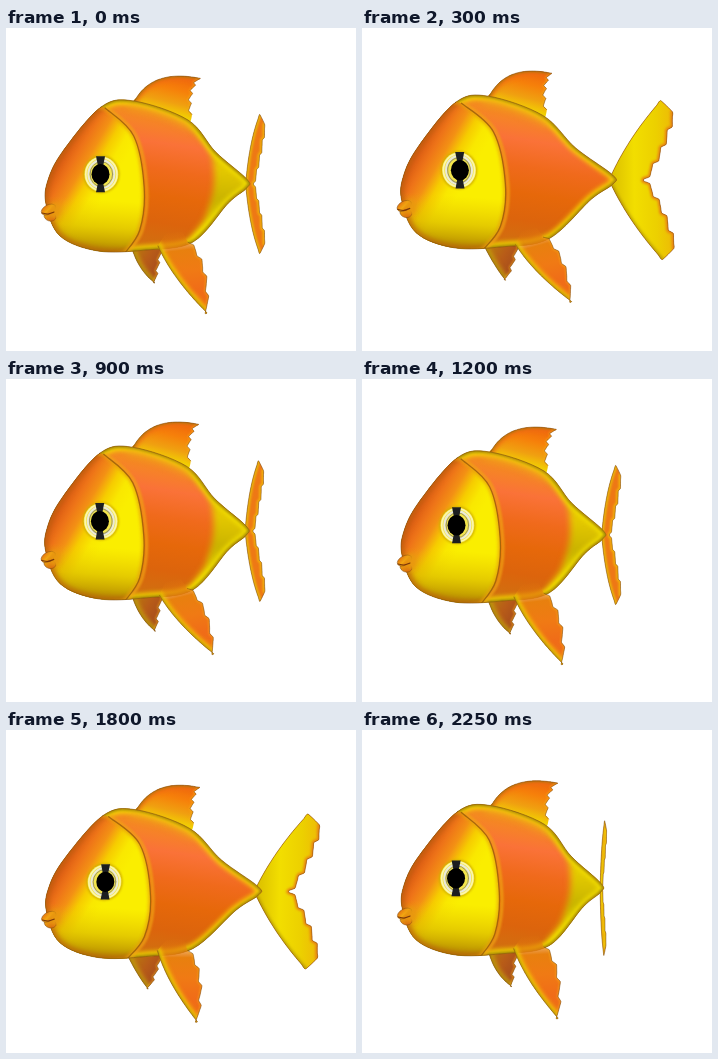
An HTML page with a canvas that plays this animation: 350 by 323 pixels, repeating every 2.4 s.

```html
<!DOCTYPE html>
<html lang="en">
<head>
<meta charset="utf-8">
<title>Goldfish</title>
<style>
  html, body { margin: 0; width: 100%; height: 100%; overflow: hidden; background: #fff; }
  canvas { display: block; width: 350px; height: 323px; }
</style>
</head>
<body>
<canvas id="stage" width="350" height="323"></canvas>
<script>
const ctx = document.getElementById('stage').getContext('2d');
const STEP = 150, STEPS = 16, TAU = 2 * Math.PI;
const ORANGE = '#f0720c', CORAL = '#fa7238', YELLOW = '#f4e000', OLIVE = '#9c7c08', EDGE = '#7d4a10';

const pairs = text => text.split(' ').map(p => p.split(',').map(Number));
const clamp = (v, a = 0, b = 1) => Math.min(b, Math.max(a, v));

const BODY = pairs('95,79 57,123 42,152 40,176 54,208 92,223 140,222 187,214 226,175 246,160 246,151 212,124 182,92 128,73');
const SEAM = pairs('100,80 130,108 141,160 136,202 119,226');

// Smooth curve through a few points.
function smooth(pts, closed = false, k = 6) {
  const n = pts.length, p = new Path2D();
  const at = i => closed ? pts[(i + n) % n] : pts[clamp(i, 0, n - 1)];
  p.moveTo(...pts[0]);
  for (let i = 0; i < (closed ? n : n - 1); i++) {
    const [a, b, c, d] = [at(i - 1), at(i), at(i + 1), at(i + 2)];
    p.bezierCurveTo(b[0] + (c[0] - a[0]) / k, b[1] + (c[1] - a[1]) / k,
      c[0] - (d[0] - b[0]) / k, c[1] - (d[1] - b[1]) / k, c[0], c[1]);
  }
  if (closed) p.closePath();
  return p;
}

// Points on a quadratic arc; `ragged` cuts teeth of that depth into it.
function arc([ax, ay], [cx, cy], [bx, by], ragged = 0, teeth = 4) {
  const len = Math.hypot(bx - ax, by - ay), n = 16;
  return Array.from({ length: n + 1 }, (_, i) => {
    const t = i / n, u = 1 - t;
    const off = ragged * ((t * teeth) % 1 - 0.5) / len;
    return [u * u * ax + 2 * u * t * cx + t * t * bx + off * (by - ay),
      u * u * ay + 2 * u * t * cy + t * t * by - off * (bx - ax)];
  });
}

function ramp(x0, y0, x1, y1, ...stops) {
  const g = ctx.createLinearGradient(x0, y0, x1, y1);
  stops.forEach((c, i) => g.addColorStop(i / (stops.length - 1), c));
  return g;
}

function paint(kind, path, color, blur, alpha, width) {
  ctx.save();
  if (blur) ctx.filter = `blur(${blur}px)`;
  ctx.globalAlpha = alpha;
  ctx[kind + 'Style'] = color;
  ctx.lineWidth = width;
  ctx.lineJoin = ctx.lineCap = 'round';
  ctx[kind](path);
  ctx.restore();
}
const fill = (path, color, blur = 0, alpha = 1) => paint('fill', path, color, blur, alpha, 1);
const stroke = (path, color, width, blur = 0, alpha = 1) => paint('stroke', path, color, blur, alpha, width);

// Filled form, shading kept inside it, thin contour.
function part(path, color, shade, contour = path) {
  fill(path, color);
  ctx.save();
  ctx.clip(path);
  shade();
  ctx.restore();
  stroke(contour, EDGE, 0.8, 0, 0.7);
}

function oval(x, y, rx, ry = rx, turn = 0) {
  const p = new Path2D();
  p.ellipse(x, y, rx, ry, turn, 0, TAU);
  return p;
}

// Fin with a plain leading edge and a ragged trailing edge.
function fin(lead, trail, root, color, rim) {
  const outline = [...lead, ...trail];
  const front = smooth(lead), rear = smooth(trail, false, 12);
  part(smooth([...outline, ...root], true, 12), color, () => {
    stroke(front, rim, 7, 2, 0.85);
    stroke(front, OLIVE, 2.5, 0.8, 0.7);
    stroke(rear, '#f9b01a', 2, 0.8, 0.7);
  }, smooth(outline, false, 12));
}

function drawTail(s) {
  const turn = Math.sin((47 - 41 * s) * Math.PI / 180);
  const high = (75.5 - 6.5 * s) / 80.5, lit = clamp(-s * 1.5);
  const fold = ([x, y]) => [x * turn ** (1.5 - x / 138), y * high];
  const lead = arc([-2, -3], [17, -42], [51, -79]);
  const trail = arc([65, -67], [56, -30], [35, 0], 5);
  const flip = pts => pts.map(([x, y]) => [x, -y]).reverse();
  const edge = [...trail, ...flip(trail)].map(fold);
  const fronts = [lead.map(fold), flip(lead).map(fold)];
  const shape = smooth([...fronts[0], ...edge, ...fronts[1]], true, 12);
  ctx.save();
  ctx.translate(245.5 - 7.5 * s, 156);
  part(shape, ramp(0, 0, 60, 0, '#ee7a14', '#ee6c1c'), () => {
    for (const f of fronts) stroke(smooth(f), '#e8c808', 4, 1.2, 0.8);
    stroke(smooth(edge), YELLOW, 4, 1, 0.8 * clamp(s));
    fill(shape, ramp(0, 0, 66, 0, '#dcc000', '#f2de00', '#ecd000', '#eeb408'), 0, lit);
    stroke(smooth(edge), '#e88414', 4, 1.2, lit);
    stroke(smooth(fronts[1]), OLIVE, 3, 1.5, lit * 0.7);
  });
  ctx.restore();
}

function drawDorsal(s) {
  const tip = [191 + 2 * s, 50];
  fin(arc([128, 74], [145, 41], tip), arc(tip, [181, 62], [184, 86], -4), [[182, 96], [150, 86]],
    ramp(165, 46, 155, 86, '#f0680c', '#f6800a', '#f0a010', '#f2d800'), '#ee6c14');
}

function drawFlank(shape, s) {
  const stock = clamp(0.45 + s * 0.75);
  const belly = smooth([[185, 90], [204, 122], [208, 155], [200, 188], [186, 220], [260, 220], [260, 95]], true);
  fill(belly, ramp(215, 105, 205, 205, '#cfa80c', '#e6cc00', '#c8b400', '#e8d800'), 3, stock);
  stroke(shape, YELLOW, 10, 2, 0.85);
  stroke(shape, OLIVE, 4, 1.2, 0.8);
  stroke(smooth([[125, 78], [155, 86], [185, 100]]), '#f0a818', 6, 3, 0.6);
}

function drawHead(shape, head) {
  ctx.save();
  ctx.clip(head);
  fill(head, ramp(61, 122, 109, 150, '#dc5c14', '#ee7418', '#f39014', '#f6cc00', '#f9e800', '#faee00'));
  fill(head, ramp(100, 172, 96, 226, 'rgba(230,190,0,0)', 'rgba(215,180,0,.6)', 'rgba(160,110,0,.9)'));
  stroke(shape, '#b8600c', 6, 2.5, 0.8);
  stroke(head, '#e8a00d', 5, 1.5, 0.7);
  ctx.restore();
}

function drawBody(s) {
  const shape = smooth(BODY.map(([x, y]) => [x - s * 7.5 * clamp((x - 187) / 58), y]), true);
  const line = SEAM.map(([x, y], i) => [x - s * 4 * Math.sin(Math.PI * (i + 0.5) / 5), y]);
  const seam = smooth(line), head = smooth(line);
  head.lineTo(20, 240);
  head.lineTo(20, 60);
  head.closePath();
  part(shape, ramp(180, 92, 160, 222, '#f48a20', CORAL, '#f06a1c', '#e6680a', '#dc640c', '#d07010'), () => {
    drawFlank(shape, s);
    drawHead(shape, head);
    ctx.translate(2.5, 0);
    stroke(seam, '#f0a414', 3, 1, 0.8);
    ctx.translate(-2.5, 0);
    stroke(seam, '#985c08', 1.3, 0, 0.8);
  });
}

function drawLips() {
  part(oval(44, 188.5, 6, 4.5, 0.3), ramp(38, 184, 46, 194, '#f0b010', '#d8640f'), () => {});
  part(oval(42.5, 181.5, 7.8, 4.6, -0.5), ramp(37, 177, 47, 187, '#e0620f', '#f3a812', '#cc540c'), () => {});
  fill(oval(49, 183, 5, 8), '#e8980f', 2);
  stroke(smooth([[36, 185], [42, 186], [48, 184]]), '#7a3608', 1.1);
}

function drawEye(s) {
  ctx.save();
  ctx.translate(96.5 - 2.8 * s, 146.2);
  const dx = s * 1.2;
  fill(oval(dx, 0, 18, 18.8), '#cfac00', 0.8);
  fill(oval(dx, 0, 17, 17.8), '#f4e64c');
  stroke(oval(dx, 0, 15.6, 16.4), '#fbf6b0', 1.6);
  stroke(oval(dx, 0, 13, 14), '#e9e9dc', 2);
  stroke(oval(dx, 0, 11.3, 12.4), '#99946c', 1);
  for (const side of [-1, 1]) {
    const bar = new Path2D();
    bar.moveTo(-2.5, 8 * side);
    bar.lineTo(2.5, 8 * side);
    bar.lineTo(4.5, 18 * side);
    bar.lineTo(-4.5, 18 * side);
    fill(bar, '#1c1e20');
  }
  fill(oval(0, 0, 9, 10.2), '#000');
  ctx.restore();
}

function drawFar(s) {
  const tip = [146 + 4.2 * s, 255];
  fin(arc([124 + 3 * s, 221], [133, 243], tip), arc(tip, [151, 240], [156, 220], -3, 3), [[140, 212]],
    ramp(128, 225, 152, 240, '#b8740f', '#b85c18', '#a84e1c'), '#c8a010');
}

function drawNear(s, c) {
  const up = Math.max(0, c), size = 1 - 0.07 * up, tip = [33, 71];
  ctx.save();
  ctx.translate(168, 214);
  ctx.rotate((-0.9 - 8.3 * c - up + 1.2 * s) * Math.PI / 180);
  ctx.scale(size, size);
  fin(arc([-16, 4], [-2, 36], tip), arc(tip, [37, 24], [16, 0], -4), [[8, -10], [-8, -8]],
    ramp(4, -12, 14, 70, 'rgba(224,112,12,0)', '#e8800e', '#f07a14', '#f06c18', '#ee7016'), YELLOW);
  ctx.restore();
}

function draw(k) {
  const s = Math.cos(TAU * (k - 7) / 8);   // tail sway
  const c = Math.cos(TAU * (k - 4) / 16);  // rise and fall
  const lean = 0.015 * c;
  ctx.setTransform(1, 0, 0, 1, 0, 0);
  ctx.fillStyle = '#fff';
  ctx.fillRect(0, 0, 350, 323);
  ctx.setTransform(1, 0, lean, 1 + lean, -0.8 * c - 150 * lean, -5.6 * c - 150 * lean);
  drawFar(s);
  drawTail(s);
  drawDorsal(s);
  drawBody(s);
  drawLips();
  drawEye(s);
  drawNear(s, c);
}

let last = -1;
function tick() {
  const k = Math.floor(performance.now() / STEP) % STEPS;
  if (k !== last) draw(last = k);
  requestAnimationFrame(tick);
}
tick();
</script>
</body>
</html>
```
